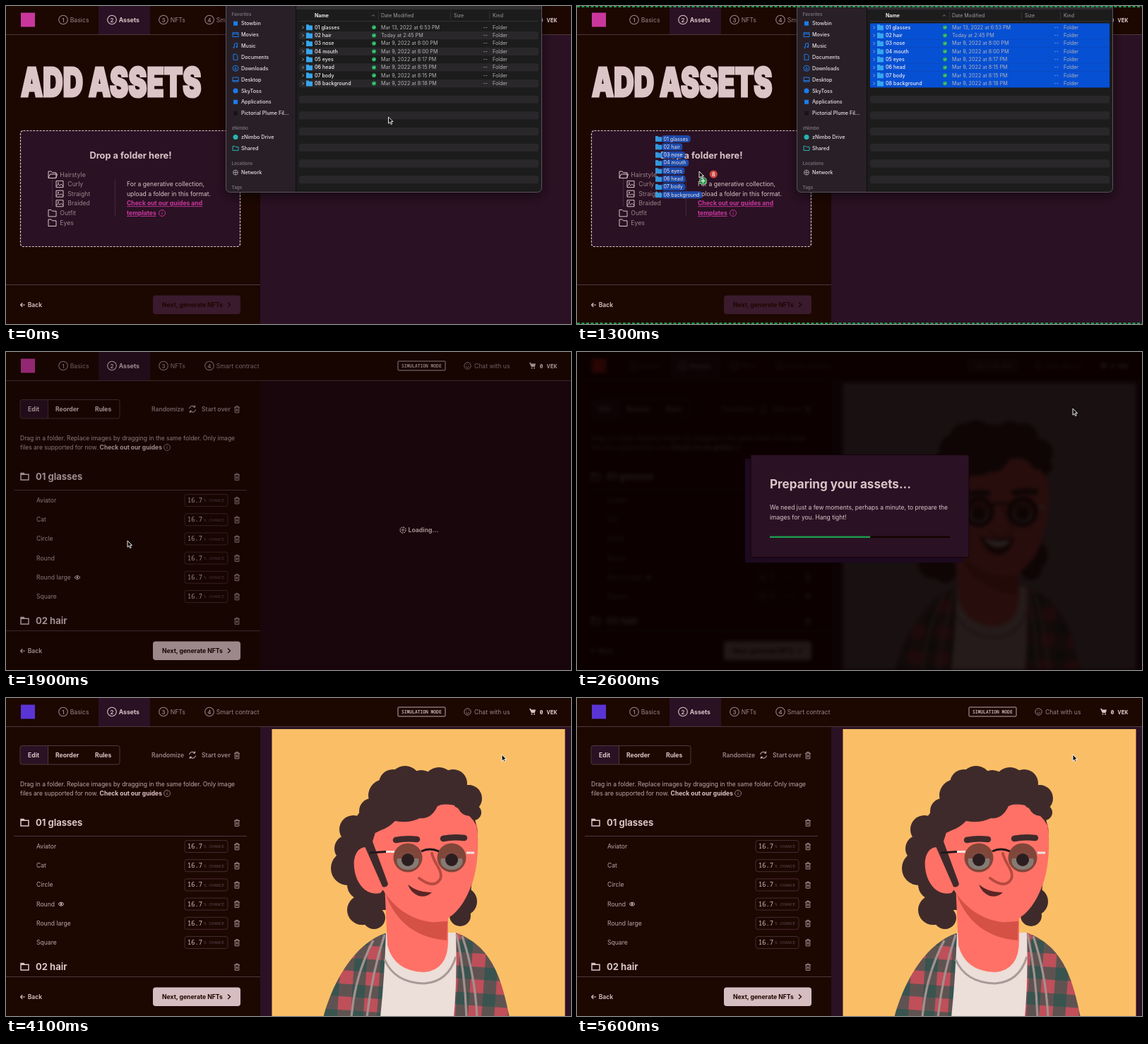
An HTML page that plays this animation: 800 by 450 pixels, repeating every 5.7 s.

```html
<!DOCTYPE html>
<html lang="en">
<head>
<meta charset="utf-8">
<title>Add assets</title>
<style>
html, body { margin: 0; width: 100%; height: 100%; overflow: hidden; background: #0c0100; }
svg { display: block; width: 100vw; height: 100vh; }
text { font-family: Inter, "Liberation Sans", sans-serif; white-space: pre; }
.mono { font-family: "Noto Sans Mono", "DejaVu Sans Mono", monospace; }
</style>
</head>
<body>
<svg id="stage" viewBox="0 0 800 450"></svg>
<script>
const BG = '#1d0701', PLUM = '#2b1124', LIGHT = '#dcc4c7', SOFT = '#bda5a9', MID = '#9b8389', PINK = '#c9379d';
const GREEN = '#1f9a4f', BLUE = '#1a7cf0', TEAL = '#25b5b5', HAIR = '#3f2a2b', SKIN = '#ff7166', LINE = '#4d383b';
const LOOP = 5700;

// Markup helpers
const text = (x, y, s, size = 8.6, fill = LIGHT, weight = 400, more = '') =>
  `<text x="${x}" y="${y}" font-size="${size}" fill="${fill}" font-weight="${weight}" ${more}>${s}</text>`;
const mono = (x, y, s, size, fill, weight = 400) => text(x, y, s, size, fill, weight, 'class="mono"');
const rect = (x, y, w, h, fill, more = '') =>
  `<rect x="${x}" y="${y}" width="${w}" height="${h}" fill="${fill}" ${more}/>`;
const disc = (x, y, r, fill, more = '') => `<circle cx="${x}" cy="${y}" r="${r}" fill="${fill}" ${more}/>`;
const oval = (x, y, rx, ry, fill) => `<ellipse cx="${x}" cy="${y}" rx="${rx}" ry="${ry}" fill="${fill}"/>`;
const shape = (d, fill) => `<path d="${d}" fill="${fill}"/>`;
const line = (d, color, width = 1, more = '') =>
  `<path d="${d}" fill="none" stroke="${color}" stroke-width="${width}" ${more}/>`;
const group = (id, body, more = '') => `<g id="${id}" ${more}>${body}</g>`;

// Icons
const trash = (x, y) => line(`M${x - 4} ${y - 2.8}h8m-6.8 0v7.6h5.6v-7.6m-4.2 0v-1.6h2.8v1.6m-2.2 2v3.8m1.6-3.8v3.8`, '#b59da1', .9);
const folder = (x, y, color, width = 1) => line(`M${x} ${y - 4.5}h4l1.5 1.8h5.5v7.7h-11z`, color, width);
const blueFolder = (x, y) => shape(`M${x} ${y - 4}h3.5l1 1.2h4.5v6.8h-9z`, '#36a5ee');
const picture = (x, y) => line(`M${x} ${y - 4.5}h10v9h-10zm0 7.5l3-3 2 2 2-2 3 3`, LIGHT) + disc(x + 3, y - 1.7, 1, LIGHT);
const info = (x, y, color) => line(`M${x - 4.5} ${y}a4.5 4.5 0 1 0 9 0a4.5 4.5 0 1 0-9 0m4.5-.8v3m0-5v1`, color, .9);
const eye = (x, y) => line(`M${x - 4} ${y}q4-5 8 0q-4 5-8 0z`, LIGHT) + disc(x, y, 1.4, LIGHT);

const folders = ['01 glasses', '02 hair', '03 nose', '04 mouth', '05 eyes', '06 head', '07 body', '08 background'];
const rowY = i => 30.3 + 11.33 * i;

function nav() {
  const steps = [[81, 'Basics'], [150, 'Assets'], [223, 'NFTs'], [288, 'Smart contract']];
  return rect(131, 0, 73, 40, PLUM) + line('M0 40.5H800', LINE) +
    rect(21, 9.5, 20, 20, PINK, 'id="logo"') +
    steps.map(([x, name], i) => {
      const color = i === 1 ? LIGHT : MID;
      return disc(x, 19.5, 6.3, 'none', `stroke="${color}" stroke-width="1.1"`) +
        text(x, 22.5, i + 1, 8, color, 600, 'text-anchor="middle"') +
        text(x + 9.7, 22.7, name, 8.7, color, i === 1 ? 700 : 400);
    }).join('') +
    rect(555, 13, 67, 13, 'none', `stroke="${SOFT}" rx="1"`) + mono(560, 21.7, 'SIMULATION MODE', 6.3, SOFT, 700) +
    disc(653.5, 19.5, 4.7, 'none', `stroke="${MID}"`) + line('M651 20.5q2.5 3 5 0m-4-3v1m3-1v1', MID, .9) +
    text(663, 22.7, 'Chat with us', 8.6, MID) +
    shape('M741 15h2l.6 1.5h6.4l-1.2 4.5h-5z', LIGHT) + disc(744.5, 22.7, 1, LIGHT) + disc(748, 22.7, 1, LIGHT) +
    mono(755.5, 22.7, '0 VEK', 8.4, LIGHT, 700);
}

function dropPage() {
  const tree = [[60, 'Hairstyle'], [71, 'Curly'], [71, 'Straight'], [71, 'Braided'], [60, 'Outfit'], [60, 'Eyes']];
  return rect(360, 41, 440, 409, PLUM) +
    `<g transform="translate(21 127.5) scale(.69 1)">${text(0, 0, 'ADD ASSETS', 57, LIGHT, 900, `stroke="${LIGHT}" stroke-width="3"`)}</g>` +
    rect(20.5, 176.5, 311, 164, PLUM, `rx="4" stroke="${LIGHT}" stroke-width="1.2" stroke-dasharray="3 1.6"`) +
    text(176.5, 215.5, 'Drop a folder here!', 12.8, LIGHT, 700, 'text-anchor="middle"') +
    line('M65.5 244V284M154.5 246V298', '#5d4453', .8, 'stroke-dasharray="1.5 1"') +
    tree.map(([x, name], i) => {
      const y = 238.5 + 13.6 * i;
      return (x > 60 ? picture(x, y) : folder(x, y, LIGHT)) + (i ? '' : line('M60 243l2.5-5h10l-1.5 5', LIGHT)) +
        text(x + 16.3, y + 3, name, 8.7, MID);
    }).join('') +
    text(171, 255, 'For a generative collection,') + text(171, 269, 'upload a folder in this format.') +
    text(171, 282.3, 'Check out our guides and', 8.6, PINK, 700, 'text-decoration="underline"') +
    text(171, 296, 'templates', 8.6, PINK, 700, 'text-decoration="underline"') + info(221, 293, PINK);
}

function listPage() {
  const items = ['Aviator', 'Cat', 'Circle', 'Round', 'Round large', 'Square'];
  const title = (y, s) => folder(21, y, LIGHT, 1.5) + shape(`M21 ${y - 4.5}h4l1.5 2.5h-5.5z`, LIGHT) +
    text(42, y + 4.8, s, 13, LIGHT, 700) + trash(327, y + .5);
  return rect(20, 67.5, 39.5, 26.5, PLUM, 'rx="3"') +
    rect(20, 67.5, 141, 26.5, 'none', `rx="3" stroke="${LINE}"`) + line('M59.5 68V94', LINE) +
    text(31, 83.7, 'Edit', 8.6, LIGHT, 700) + text(70, 83.7, 'Reorder', 8.6, LIGHT, 700) +
    text(126, 83.7, 'Rules', 8.6, LIGHT, 700) +
    text(206, 83.7, 'Randomize', 8.6, MID, 600) + text(277, 83.7, 'Start over', 8.6, MID, 600) + trash(327, 81) +
    line('M259.5 80a4.5 4.5 0 0 1 8-2v-2.5m0 2.5h-2.5M268.5 81.5a4.5 4.5 0 0 1-8 2v2.5m0-2.5h2.5', LIGHT) +
    text(20, 124.5, 'Drag in a folder. Replace images by dragging in the same folder. Only image', 8.5, SOFT) +
    text(20, 138, `files are supported for now. <tspan font-weight="700" fill="${LIGHT}">Check out our guides</tspan>`, 8.5, SOFT) +
    info(228, 135, MID) + title(176, '01 glasses') + line('M11 195.5H341', LINE) +
    items.map((name, i) => {
      const y = 210 + 27.2 * i;
      return text(43, y + 3, name, 8.6, SOFT) + rect(253, y - 8.5, 61, 17, 'none', 'rx="3" stroke="#472a30"') +
        mono(257, y + 3, '16.7', 8.7, LIGHT) + mono(280, y + 2.3, '% CHANCE', 6.1, '#604652') + trash(327, y);
    }).join('') + title(380, '02 hair') +
    group('eyeLarge', eye(101, 319)) + group('eyeRound', eye(78, 291.6)) +
    rect(360, 41, 440, 409, PLUM) +
    group('loading', rect(360, 41, 440, 409, '#200810') + disc(562, 252, 4, 'none', `stroke="${LIGHT}" stroke-width="1.3" stroke-dasharray="2.2 .9"`) +
      disc(562, 252, 1.4, 'none', `stroke="${LIGHT}"`) + text(569.5, 255, 'Loading...', 8.7, LIGHT, 700)) +
    group('portrait', portrait());
}

function portrait() {
  const curls = [[484, 241, 24], [484, 213, 19], [492, 186, 20], [518, 160, 18], [536, 138, 23], [548, 121, 20], [565, 118, 22],
    [588, 122, 20], [613, 120, 22], [633, 121, 20], [655, 142, 19], [662, 162, 11], [505, 264, 22], [504, 300, 21], [521, 311, 16],
    [647, 288, 20], [643, 308, 15]];
  const lens = x => disc(x, 226, 20.5, '#80463a') + oval(x, 231, 15.5, 12, '#857b74') + shape(`M${x - 17} 227Q${x} 211 ${x + 17} 227Z`, '#80463a') +
    disc(x, 229, 9, '#2c1e20');
  const rim = x => disc(x, 226, 19, 'none', 'stroke="#211719" stroke-width="5"');
  const brow = (x, y) => line(`M${x} ${y}q14-3 30-1`, HAIR, 8.5, 'stroke-linecap="round"');
  return `<clipPath id="frame">${rect(376.5, 44, 415, 406, '#000')}</clipPath><g clip-path="url(#frame)">` +
    rect(376, 44, 416, 406, '#fabf66', 'id="backdrop"') +
    curls.map(c => disc(...c, HAIR)).join('') +
    shape('M480 190L524 130H650L668 192 655 300H520L470 250Z', HAIR) +
    // Jacket and shirt
    shape('M537 333C500 345 466 390 449 452H713C702 400 690 352 637 332Z', 'url(#plaid)') +
    shape('M538 332Q536 395 530 452H634Q639 400 637 332Z', '#ecded8') +
    line('M536 370Q550 403 592 404Q626 402 637 366', '#a99a98', 3) +
    line('M520 343Q494 392 489 452M536 335Q518 390 511 452M646 337Q664 390 667 452M638 334Q650 390 652 452', '#a2918f', 3.2) +
    // Neck, ear and face
    shape('M536 262L540 350Q550 387 592 388Q626 385 626 343V300Z', SKIN) +
    shape('M537 276Q565 312 604 317L625 316 624 343C585 340 552 320 537 276Z', '#d55146') +
    shape('M516 213C500 206 491 222 493 240C495 262 510 281 530 276L542 262 520 213Z', SKIN) +
    shape('M518 200C540 140 650 130 667 180C670 210 668 245 657 270C643 305 622 319 602 317C575 314 550 298 534 272Z', SKIN) +
    // Fringe and sideburn
    shape('M504 197Q520 193 531 187Q541 184 551 174Q570 178 586 170Q602 172 611 153Q624 147 640 156Q646 167 656 167Q668 178 668 192L662 160 650 130H540L506 162Z', HAIR) +
    line('M614 157q10-7 21-3', SKIN, 3.5) +
    shape('M505 192L524 187 519 203 541 263Q539 269 533 267L508 210Z', HAIR) +
    brow(552, 201) + brow(619, 199) + lens(569) + lens(631) +
    line('M588 217Q600 211 613 217M515 219L538 217.5', '#211719', 3) + line('M538 217.5H550M652 219H663', '#f1e4df', 3) +
    line('M603 220C607 236 619 244 615 256Q606 271 585 255', '#b84a40', 3.8, 'stroke-linecap="round"') +
    group('smirk', shape('M569 264Q584 276 603 275Q595 283 584 280Q573 275 569 264Z', '#5a2526')) +
    group('grin', shape('M570 260Q592 268 620 262Q612 290 592 287Q576 282 570 260Z', '#5a2526') +
      shape('M576 264Q594 270 614 266Q609 277 594 276Q582 274 576 264Z', '#fff') + rim(569) + rim(631)) +
    '</g>';
}

function finder() {
  const stamps = ['Mar 13, 2022 at 6:53 PM', 'Today at 2:45 PM', ...['8:00', '8:00', '8:17', '8:15', '8:15', '8:18'].map(h => `Mar 9, 2022 at ${h} PM`)];
  const square = 'M-3-3h6v6h-6z', round = 'M3.5 0a3.5 3.5 0 1 1-7 0 3.5 3.5 0 1 1 7 0';
  const side = [
    ['Stowbin', square, 1], ['Movies', 'M-4-3h8v6h-8zM-4-1h8'], ['Music', 'M-1.5 3h-1.5v-1.5h1.5v-4.5l4-1v6h-1.5v-1.5h1.5'],
    ['Documents', 'M-3-4h4l2 2v6h-6z'], ['Downloads', 'M4 0a4 4 0 1 1-8 0 4 4 0 1 1 8 0M0-2v4m-1.7-1.6L0 2 1.7.4'],
    ['Desktop', 'M-4-3h8v6h-8zM-4 1.5h8'], ['SkyToss', round, 1], ['Applications', square, 1], ['Pictorial Plume Fil...', square, 1, '#17131a'],
    ['zNimbo Drive', round, 1, TEAL, 185.5], ['Shared', 'M-4-3h3l1 1h4v5h-8z', 0, TEAL, 201.4], ['Network', round + 'M-3.5 0h7M0-3.5v7', 0, '#98929b', 235.6]];
  const heads = [['Favorites', 11.7], ['zNimbo', 172.6], ['Locations', 222.5], ['Tags', 256.5]];
  const grey = '#a19da2', cell = '#b7b3b8';
  let s = rect(311, -20, 448, 284, '#1e1c1f', 'rx="6" filter="url(#shadow)"') +
    shape('M311 0H410V264H317Q311 264 311 258Z', '#292027') + rect(410, 0, 349, 5, '#302d31') + line('M410.5 0V264', '#0f0d10');
  s += heads.map(([name, y]) => text(319.5, y + 2.5, name, 6.3, '#77707a', 600)).join('');
  s += side.map(([name, d, solid, color = BLUE, y], i) => {
    y ??= 24.7 + 15.87 * i;
    return `<path transform="translate(325 ${y})" d="${d}" fill="${solid ? color : 'none'}" stroke="${color}" stroke-width="${solid ? 0 : 1}"/>` +
      text(333, y + 2.7, name, 7.2, '#e6e1e6', 500);
  }).join('');
  s += text(437, 15.7, 'Name', 7, '#eee', 700) + text(531, 15.7, 'Date Modified', 7, grey) + text(634, 15.7, 'Size', 7, grey) +
    text(689, 15.7, 'Kind', 7, grey) + line('M518 14.5l2-2 2 2', grey, .8) + line('M527.5 8V19M629.5 8V19M684.5 8V19M415 21.5H754', '#3a373b', .8);
  for (let i = 1; i < 20; i += 2) s += rect(415, rowY(i) - 5.6, 339, 11.2, '#29272a', 'rx="2.5"');
  s += folders.map((name, i) => {
    const y = rowY(i), base = y + 2.5;
    return rect(415, y - 5.8, 339, 11.6, '#0650d4', 'class="pick"') + line(`M419.5 ${y - 2}l2 2-2 2`, '#aaa6ab') + blueFolder(425, y) +
      text(437, base, name, 7.1, '#f2eef2', 500) + disc(521, y, 3, '#1ea455') + line(`M519.6 ${y}l1 1 1.8-2`, '#d9ffe6', .8) +
      text(531, base, stamps[i], 7.2, cell) + text(682, base, '--', 7.1, cell, 400, 'text-anchor="end"') +
      text(689, base, 'Folder', 7.1, cell);
  }).join('');
  return s + rect(311.5, -20, 447, 283.5, 'none', 'rx="6" stroke="#59535b"') +
    rect(0, 0, 0, 0, '#ffffff30', 'id="marquee" stroke="#ffffff60" stroke-width=".6"');
}

const dragStack = () => folders.map((name, i) => {
  const y = 188 + 11.33 * i;
  return blueFolder(111, y) + rect(120, y - 5, 0, 10, '#1c50b8', 'rx="4" class="pill"') + text(122.5, y + 2.5, name, 7.1, '#fff');
}).join('') + disc(193.3, 238, 5.6, '#e0483c') + text(193.3, 240.6, '8', 7, '#fff', 700, 'text-anchor="middle"') +
  group('plus', disc(178.5, 247.5, 5.2, '#22a447', 'stroke="#fff" stroke-width=".5"') + line('M175.5 247.5h6m-3-3v6', '#fff', 1.3));

const modal = () => rect(238, 151, 309, 147, '#1d0a1f') + rect(246, 145.5, 309, 145, PLUM, 'stroke="#120306"') +
  text(273, 192.5, 'Preparing your assets...', 17.1, LIGHT, 700) +
  text(273, 223, 'We need just a few moments, perhaps a minute, to prepare the', 8.5) + text(273, 236.5, 'images for you. Hang tight!', 8.5) +
  rect(273, 260.5, 255, 2.5, '#140300') + rect(273, 260.5, 0, 2.5, GREEN, 'id="bar"');

const stage = document.getElementById('stage');
stage.innerHTML = `<defs>
  <pattern id="plaid" width="37" height="37" patternUnits="userSpaceOnUse" patternTransform="rotate(4)">
    ${rect(0, 0, 37, 37, '#bf4f59') + rect(0, 0, 18, 37, '#1f554c', 'opacity=".6"') + rect(0, 0, 37, 18, '#1f554c', 'opacity=".6"')}
  </pattern>
  <filter id="shadow" x="-20%" y="-20%" width="140%" height="140%"><feDropShadow dx="0" dy="5" stdDeviation="9" flood-opacity=".5"/></filter>
</defs>` +
  group('app', rect(0, 0, 800, 450, BG) + nav() + group('drop', dropPage()) + group('list', listPage()) +
    rect(0, 395, 360, 55, BG) + line('M0 394.5H360', LINE) + line('M20.5 423h6.5m-6.5 0l2.8-2.8m-2.8 2.8l2.8 2.8', LIGHT, 1.2) +
    text(30.7, 426, 'Back', 8.6, LIGHT, 600) + rect(208, 409.5, 124, 26.5, PLUM, 'rx="4" id="button"') +
    text(221, 425.7, 'Next, generate NFTs', 8.65, BG, 700) + line('M314 419.5l3.5 3.3-3.5 3.3', BG, 1.3)) +
  group('finder', finder()) + group('stack', dragStack(), 'opacity=".9"') + rect(0, 0, 800, 450, '#0a0000', 'id="dim"') +
  group('modal', modal()) + group('edge', line('M0 1H800M0 449H800', GREEN, 2, 'stroke-dasharray="4 2.5"')) +
  group('cursor', '<path d="M0 0v9.2l2.1-1.9 1.5 3.2 1.6-.7-1.5-3.2h2.9z" fill="#111" stroke="#fff" stroke-width=".9"/>');

const el = Object.fromEntries([...stage.querySelectorAll('[id]')].map(n => [n.id, n]));
const picks = [...stage.querySelectorAll('.pick')], pills = [...stage.querySelectorAll('.pill')];
pills.forEach(p => p.setAttribute('width', p.nextElementSibling.getComputedTextLength() + 6));

// Each key is [time, ...values]
const smooth = k => k * k * (3 - 2 * k), linear = k => k;
function track(keys, t, ease = linear) {
  const i = keys.findIndex(k => k[0] > t);
  if (i < 0) return keys[keys.length - 1].slice(1);
  if (!i) return keys[0].slice(1);
  const a = keys[i - 1], b = keys[i], k = ease((t - a[0]) / (b[0] - a[0]));
  return a.slice(1).map((v, j) => v + (b[j + 1] - v) * k);
}
const pointer = [[0, 541.5, 157], [200, 560, 140], [550, 430, 24], [700, 483, 76], [1300, 173, 234], [1500, 172, 267], [2000, 172, 267], [2400, 702, 80]];
const dimming = [[1800, 0], [1900, .28], [2200, .88], [3950, .88], [4080, 0]];
const popup = [[1930, 0], [2150, 1], [3950, 1], [4060, 0]];
const progress = [[2000, 0], [2600, .557], [3600, .93], [3900, .993]];
const logo = [[1900, 201, 55, 157], [2600, 255, 48, 32], [3900, 255, 120, 20], [3999, 255, 130, 20], [4000, 91, 52, 214]];

const show = (node, on) => node.style.display = on ? '' : 'none';
const set = (node, attrs) => { for (const k in attrs) node.setAttribute(k, attrs[k]); };

function draw(t) {
  const [x, y] = track(pointer, t, smooth), [dim] = track(dimming, t), [pop] = track(popup, t);
  const listed = t >= 1600, done = t >= 3980;
  show(el.drop, !listed);
  show(el.list, listed);
  show(el.finder, !listed);
  show(el.stack, t >= 700 && t < 1500);
  show(el.plus, x < 311);
  show(el.edge, t >= 1300 && t < 1600);
  show(el.loading, t < 2200);
  show(el.portrait, t >= 2200);
  show(el.eyeLarge, !done);
  show(el.eyeRound, done);
  show(el.grin, !done);
  show(el.smirk, done);
  show(el.marquee, t >= 200 && t < 600);
  set(el.backdrop, { fill: done ? '#fabf66' : '#85858c' });
  set(el.marquee, { x, y, width: Math.max(0, 560 - x), height: Math.max(0, 140 - y) });
  picks.forEach((p, i) => show(p, t >= 550 || t >= 200 && y < rowY(i) + 5.6));
  set(el.button, { fill: listed ? '#d6bdc1' : '#3a1a2d' });
  set(el.logo, { fill: `rgb(${track(logo, t).map(Math.round)})` });
  set(el.stack, { transform: `translate(${x - 173} ${y - 234})` });
  set(el.cursor, { transform: `translate(${x} ${y})` });
  set(el.dim, { opacity: dim });
  set(el.modal, { opacity: pop });
  set(el.bar, { width: 255 * track(progress, t)[0] });
  el.app.style.filter = dim > .28 ? `blur(${(dim - .28) * 4}px)` : 'none';
}

const start = performance.now();
function tick() {
  draw((performance.now() - start) % LOOP);
  requestAnimationFrame(tick);
}
tick();
</script>
</body>
</html>
```
